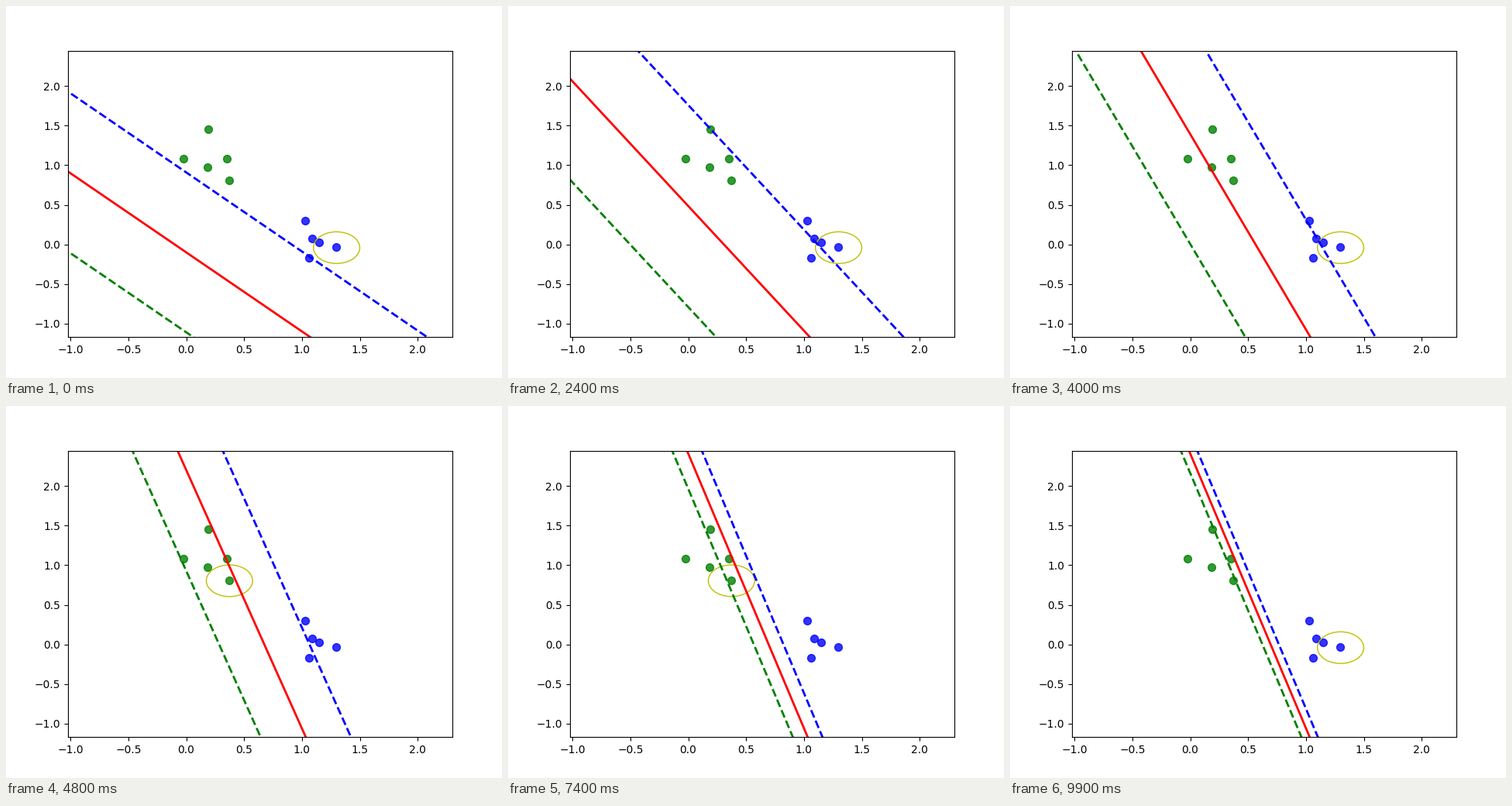
Write a matplotlib script that moves like this. It is 640 px wide and 480 px high and loops after 10 s.

```python
import numpy as np
import matplotlib.pyplot as plt
from matplotlib.animation import FuncAnimation
from matplotlib.patches import Circle
from matplotlib.transforms import Affine2D

FRAMES, INTERVAL = 100, 100
PIVOT = 1.016, -1.116    # the boundary turns about this point

# Key points of the training: sample shown, dx/dy of the boundary, margin in x
KEY_STEPS = [0, 14, 33, 48, 57, 74, 99]
KEY_PICKS = [8, 5, 0, 2, 1, 2, 8]
KEY_LEANS = [1, 0.788, 0.486, 0.306, 0.288, 0.288, 0.288]
KEY_MARGINS = [1.01, 0.92, 0.703, 0.39, 0.204, 0.128, 0.071]

# Two clusters of five points
rng = np.random.RandomState(0)
green = [0, 1] + 0.2 * rng.randn(5, 2)
blue = [1, 0] + 0.2 * rng.randn(5, 2)
points = np.vstack([green, blue])
lo, hi = points.min(axis=0) - 1, points.max(axis=0) + 1


def pick_samples():
    """Random samples, never the same one twice in a row."""
    keys = dict(zip(KEY_STEPS, KEY_PICKS))
    picks = []
    for i in range(FRAMES):
        banned = picks[-1:] + [keys.get(i + 1)]
        choices = [k for k in range(len(points)) if k not in banned]
        picks.append(keys.get(i, choices[rng.randint(len(choices))]))
    return np.array(picks)


def training_curve(picks):
    """Lean and margin move mostly when a green sample is shown."""
    progress = np.cumsum(np.where(picks < len(green), 1, 0.2))
    at_keys = progress[KEY_STEPS]
    return [np.interp(progress, at_keys, values)
            for values in (KEY_LEANS, KEY_MARGINS)]


picks = pick_samples()
leans, margins = training_curve(picks)

fig, ax = plt.subplots(figsize=(6.4, 4.8), dpi=100)
ax.set_xlim(lo[0], hi[0])
ax.set_ylim(lo[1], hi[1])

# Half a pixel up and left, so that markers snap to whole pixels
snapped = ax.transData + Affine2D().translate(-0.5, 0.5)
for cluster, color in ((green, 'g'), (blue, 'b')):
    ax.scatter(*cluster.T, s=50, c=color, alpha=0.8, transform=snapped)
ring = ax.add_patch(Circle(points[0], 0.2, color='y', fill=False))

line_y = np.array([12.0, -12.0])
lines = [(ax.plot([], [], style, lw=2)[0], side)
         for style, side in (('r-', 0), ('b--', 1), ('g--', -1))]


def update(i):
    x = PIVOT[0] - leans[i] * (line_y - PIVOT[1])
    for line, side in lines:
        line.set_data(x + side * margins[i], line_y)
    ring.center = points[picks[i]]
    return [ring] + [line for line, _ in lines]


anim = FuncAnimation(fig, update, frames=FRAMES, interval=INTERVAL)
plt.show()
```
